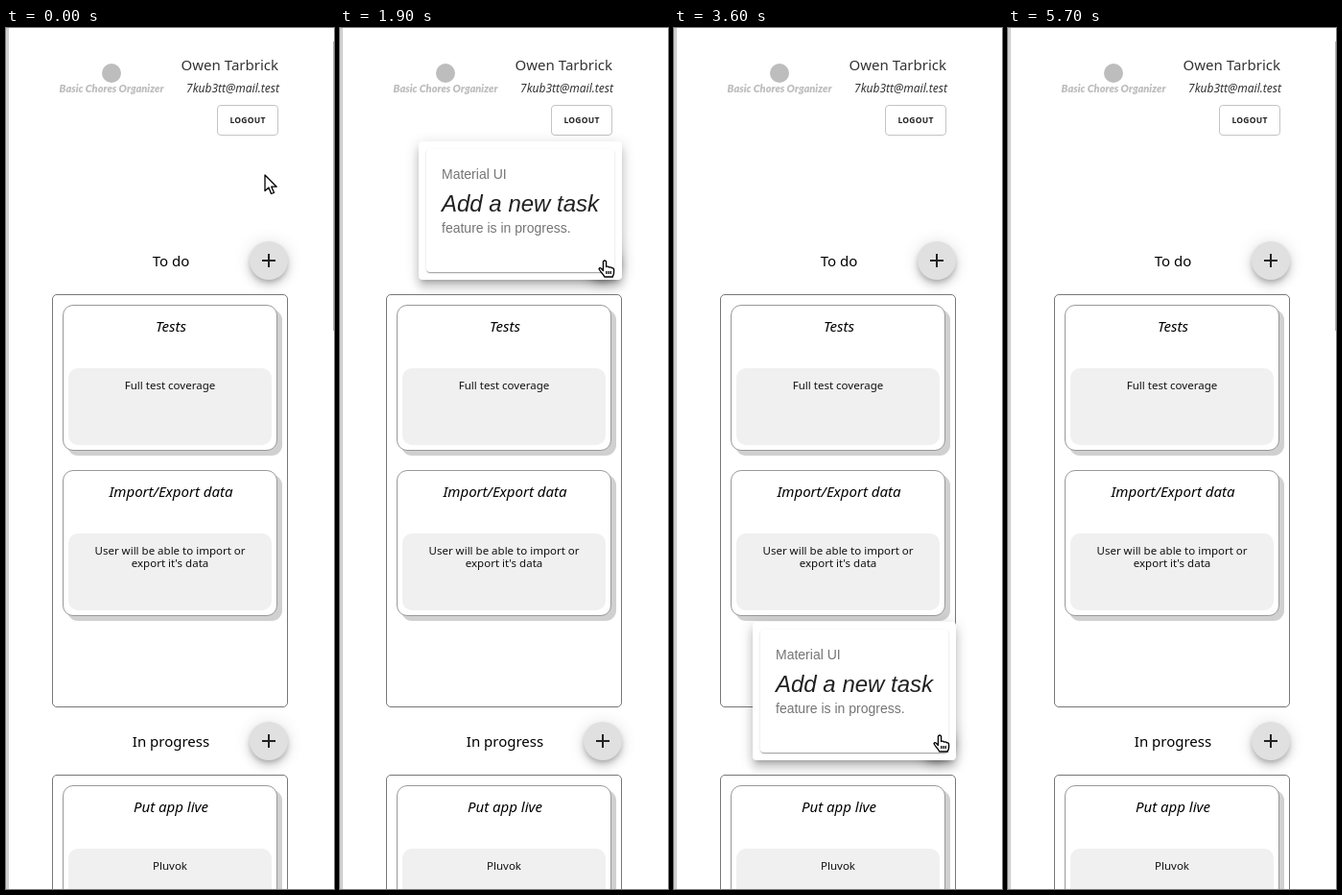
Recreate the animation shown at these times as an HTML page. Size 342 px wide and 896 px high, loop 6.1 s.

```html
<!DOCTYPE html>
<html lang="en">
<head>
<meta charset="utf-8">
<title>Task board</title>
<style>
  html, body { margin: 0; width: 100%; height: 100%; overflow: hidden; background: #fff; }
  #stage { position: relative; width: 342px; height: 896px; overflow: hidden; font-family: "Noto Sans", sans-serif; }
  #stage * { box-sizing: border-box; }
  .box, .text, #cursor { position: absolute; }
  .text { line-height: 20px; white-space: nowrap; }
  .fab { border-radius: 50%; background: #e0e0e0;
    box-shadow: 0 3px 5px -1px #0003, 0 6px 10px #00000024, 0 1px 18px #0000001f; }
  .popup { background: #fff; border-radius: 4px; transform-origin: 100% 100%; font-family: "Liberation Sans", Arial, sans-serif;
    box-shadow: 0 5px 5px -3px #0003, 0 8px 10px 1px #00000024, 0 3px 14px 2px #0000001f; }
  .paper { border-radius: 4px; box-shadow: 0 2px 1px -1px #0003, 0 1px 1px #00000024, 0 1px 3px #0000001f; }
  .column { border: 1px solid #777; border-radius: 5px; }
  .card { background: #fff; border: 1px solid #999; border-radius: 11px; box-shadow: 5px 5px #d0d0d0; }
  .note { background: #f0f0f0; border-radius: 10px; }
  #cursor { left: 0; top: 0; overflow: visible; }
  #cursor path { fill: #fff; stroke: #000; stroke-width: 1.3; stroke-linejoin: round; }
</style>
</head>
<body>
<div id="stage"></div>
<script>
const LOOP = 6100, STEP = 100, FADE = 260, GROW = FADE * 2 / 3;
const stage = document.getElementById('stage');

const box = (x, y, w, h, cls, css = '', inner = '') =>
  `<div class="box ${cls}" style="left:${x}px;top:${y}px;width:${w}px;height:${h}px;${css}">${inner}</div>`;

// x is the left, middle or right of the text, y its vertical centre
const text = (x, y, size, str, css = '', shift = -50) =>
  `<div class="text" style="left:${x}px;top:${y - 10}px;font-size:${size}px;transform:translateX(${shift}%);${css}">${str}</div>`;

const card = (y, title, ...lines) =>
  box(59, y, 224, 152, 'card') + box(65, y + 66, 212, 80, 'note') +
  text(172, y + 22, 15, title, 'font-style:italic;color:#000') +
  lines.map((line, i) => text(171, y + 83.5 + 13 * i, 11.5, line, 'color:#111')).join('');

const column = (y, title, cards) =>
  text(172, y + 20, 15, title, 'font:italic bold 15px/20px "Noto Sans",sans-serif;color:#444') +
  box(254, y, 40, 40, 'fab', '', box(13, 19, 14, 2, '', 'background:#222') + box(19, 13, 2, 14, '', 'background:#222')) +
  box(48, y + 55, 246, 430, 'column') + cards;

const popup = y => box(82, y, 212, 144, 'popup', '',
  box(8, 8, 196, 128, 'paper') +
  text(24, 34, 14, 'Material UI', 'color:#757575', 0) +
  text(24, 65, 24, 'Add a new task', 'font-style:italic;color:#212121', 0) +
  text(24, 90, 14, 'feature is in progress.', 'color:#757575', 0));

const cursors = {
  arrow: 'M0 0V16.5l4-3.5 2.5 6.5 3-1.2-2.7-6.1h5.4Z',
  point: 'M-1.6 10.5V1.6a1.6 1.6 0 0 1 3.2 0V6.5q2-.8 3 .6 2-.8 2.8.7 2-.3 2.2 1.8v3q0 2-1.2 3.4v1h-8.6q-.8-2-3.6-5-1.4-1.8-2.2-3.2.6-1.8 2.4-.6ZM1.8 11v3M4 11v3M6.2 11v3',
  grab: 'M-5 1L-6.8-4.5a1.5 1.5 0 0 1 2.9-1L-2.5-2V-7.2a1.5 1.5 0 0 1 3 0V-2.5l.6-4.8a1.5 1.5 0 0 1 3 .3l-.3 5 1.4-3.4a1.5 1.5 0 0 1 2.8 1Q8 0 6.5 4L5 9H-3.2Q-4.5 6-8 3-9 1-7 .3-6 0-5 1Z'
};

stage.innerHTML =
  box(0, 0, 3, 896, '', 'background:#d0d0d0') +
  box(100, 37, 20, 20, '', 'background:#bdbdbd;border-radius:50%') +
  text(110, 63, 11, 'Basic Chores Organizer', 'font:italic 900 11px/20px Lato,sans-serif;color:#bdbdbd') +
  text(284, 38, 15, 'Owen Tarbrick', 'color:#333', -100) +
  text(285, 63, 12, '7kub3tt@mail.test', 'font-style:italic;color:#333', -100) +
  box(220, 80, 64, 32, '', 'border:1px solid #c4c4c4;border-radius:4px') +
  text(252, 96, 8.5, 'LOGOUT', 'font-weight:600;color:#222;letter-spacing:.02857em') +
  column(222, 'To do', card(288, 'Tests', 'Full test coverage') +
    card(460, 'Import/Export data', 'User will be able to import or', "export it's data")) +
  column(722, 'In progress', card(788, 'Put app live', 'Pluvok')) +
  box(341, 14, 1, 301, 'thumb', 'background:#b5b5b5') +
  popup(118) + popup(618) +
  '<svg id="cursor" width="1" height="1"><path/></svg>';

const popups = [...stage.querySelectorAll('.popup')];
const fabs = [...stage.querySelectorAll('.fab')];
const thumb = stage.querySelector('.thumb');
const pointer = stage.querySelector('#cursor path');
const visits = [{ open: 440, close: 2040 }, { open: 3338, close: 4740 }];

// time, x, y, shape until the next key
const track = [
  [0, 270, 153, 'arrow'], [300, 274, 228, 'point'], [500, 276, 238, 'point'], [1800, 276, 238, 'point'],
  [1900, 276, 242, 'point'], [2000, 272, 285, 'arrow'], [2200, 259, 470, 'grab'], [2400, 251, 553, 'grab'],
  [2600, 251, 553, 'grab'], [2700, 256, 642, 'arrow'], [2800, 256, 642, 'arrow'], [3100, 274, 728, 'point'],
  [3300, 277, 736, 'point'], [4400, 277, 736, 'point'], [4500, 277, 728, 'point'], [4700, 268, 610, 'arrow'],
  [5000, 246, 490, 'grab'], [5100, 241, 467, 'grab'], [5400, 140, 225, 'arrow'], [5600, 66, 2, 'arrow'],
  [5700, 66, -40, 'arrow'], [LOOP, 66, -40, 'arrow']
];

// cubic-bezier(.4, 0, .2, 1)
function ease(x) {
  if (x <= 0 || x >= 1) return x <= 0 ? 0 : 1;
  let lo = 0, hi = 1, u;
  for (let i = 0; i < 20; i++) {
    u = (lo + hi) / 2;
    if (1.2 * u * (1 - u) ** 2 + .6 * u * u * (1 - u) + u ** 3 < x) lo = u; else hi = u;
  }
  return u * u * (3 - 2 * u);
}

function draw(t) {
  let locked = false;
  visits.forEach(({ open, close }, i) => {
    const closing = t >= close, age = t - (closing ? close : open);
    const fade = ease(age / FADE);
    const grow = ease((closing ? age - FADE / 3 : age) / GROW);
    const scale = .75 + .25 * (closing ? 1 - grow : grow);
    popups[i].style.opacity = closing ? 1 - fade : fade;
    popups[i].style.transform = `scale(${scale},${scale * scale})`;
    locked ||= t >= open && t < close + FADE;
  });
  thumb.style.visibility = locked ? 'hidden' : 'visible';

  const next = track.findIndex(key => key[0] > t);
  const [t0, x0, y0, shape] = track[next - 1], [t1, x1, y1] = track[next];
  const k = (t - t0) / (t1 - t0);
  const x = Math.round(x0 + (x1 - x0) * k), y = Math.round(y0 + (y1 - y0) * k);
  pointer.setAttribute('d', cursors[shape]);
  pointer.setAttribute('transform', `translate(${x} ${y})`);
  fabs.forEach((fab, i) => {
    fab.style.background = Math.hypot(x - 274, y - 242 - 500 * i) < 20 ? '#d5d5d5' : '#e0e0e0';
  });
}

const start = performance.now();
function tick() {
  const t = (performance.now() - start) % LOOP;
  draw(Math.floor(t / STEP) * STEP);
  requestAnimationFrame(tick);
}
tick();
</script>
</body>
</html>
```
